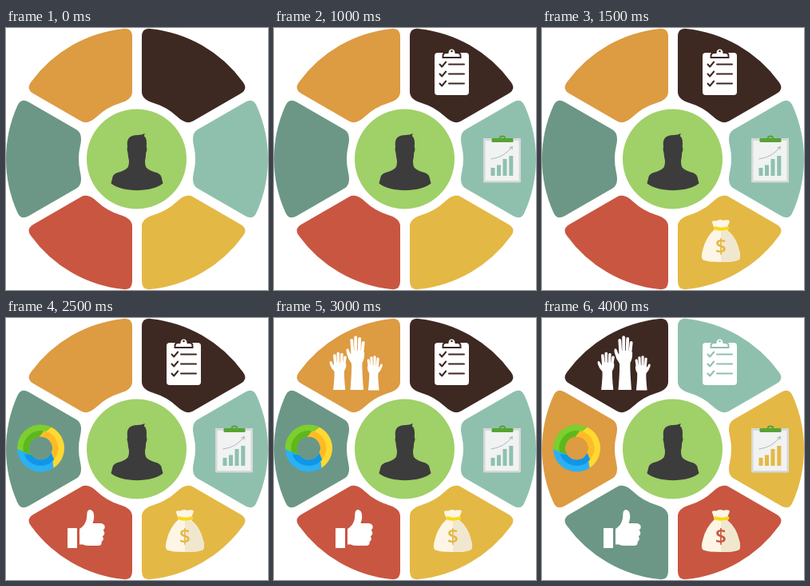
These frames come from a looping animation (328x328 px, 4.5 s). An HTML page:

```html
<!DOCTYPE html>
<html lang="en">
<head>
<meta charset="utf-8">
<title>Six-part wheel</title>
<style>
  html, body { margin: 0; width: 100%; height: 100%; overflow: hidden; background: #fff; }
  svg { display: block; width: 100vw; height: 100vh; }
  .line { fill: none; stroke-linecap: round; stroke-linejoin: round; }
  .outline { stroke: var(--color); }
  .tint { fill: var(--color); }
  text { font: 600 25px "Open Sans", "Noto Sans", sans-serif; text-anchor: middle; }
</style>
</head>
<body>
<svg viewBox="0 0 328 328">
  <defs>
    <g id="hand">
      <path class="line" stroke="#fff" stroke-width="3.8" d="M-6.2 6 L-5 25 M-1.3 2.2 V24 M3.7 4 L3 24 M8.2 9 L6.5 25"/>
      <path fill="#fff" d="M-7 22 L-5 19 H7 L9.6 21 Q10 29 7 34 Q6.500 42 8.500 68 H-8 Q-6 44 -6.500 35 Q-11 29 -12.500 22 Q-13.700 17.500 -12.200 16.500 Q-10.500 15.600 -9.600 18.500 Q-8.500 22 -7 24Z"/>
    </g>
  </defs>

  <g id="wedges" transform="translate(164 164)"></g>

  <circle cx="163.5" cy="164" r="62.5" fill="#a0d068"/>
  <path fill="#3c3c3c" d="M131.500 194.500 L133.500 186.500 Q134.500 183 139 181.300 Q150 178 152.500 174.500 Q154 172 154 166 Q152.800 161 152.500 156.500 Q150.800 152 152 149 Q151 140 154.500 137 Q158 134 165 134 Q170 134 173.800 132 L172.800 135.300 Q177 138 175.800 149 Q177.300 152 175.200 156.500 Q175 162 174 166 Q174 172 175.500 174.500 Q178 178 189 181.300 Q193.500 183 194.500 186.500 L196.500 194.500 C183 206 145 206 131.500 194.500Z"/>

  <g class="icon">
    <rect x="201" y="31" width="43" height="53" rx="4" fill="#fff"/>
    <path class="outline" fill="#fff" stroke-width="2" d="M211.500 37 V35 Q211.500 31 215.500 31 H217.500 Q218 25.500 222.500 25.500 Q227 25.500 227.500 31 H229.500 Q233.500 31 233.500 35 V37Z"/>
    <circle class="tint" cx="222.500" cy="29" r="1.300"/>
    <path class="line outline" stroke-width="2" d="M207.500 45.500 l2.700 3 l5-6 M207.500 57.500 l2.700 3 l5-6 M207.500 69.500 l2.700 3 l5-6 M219 45.500 H238 M219 57.500 H238 M219 69.500 H238"/>
  </g>

  <g class="icon">
    <rect x="262" y="138" width="47" height="55.500" rx="1" fill="#d5dad9"/>
    <rect x="264.500" y="141" width="42" height="50" fill="#f1f2f2"/>
    <rect x="272.500" y="138" width="27" height="5" rx="1" fill="#57a335"/>
    <path id="knob" class="line" stroke="#57a335" stroke-width="1.800" d="M282.500 138.500 Q282.500 135.500 286 135.500 Q289.500 135.500 289.500 138.500"/>
    <path class="tint" d="M271.500 175 h5 v10 h-5z M279 171.500 h5 v13.500 h-5z M286.500 164 h5 v21 h-5z M294.300 160 h5 v25 h-5z"/>
    <path class="line" stroke="#9ba9a5" stroke-width=".8" d="M272 164 Q288 162 298 149 M294.800 150 L298.400 148.500 L298 152"/>
  </g>

  <g class="icon">
    <path fill="#fdf6e6" d="M216 252 L213 243.500 Q212.500 240.500 218.500 241.500 Q223 239 227 241 Q231 239.500 234.500 241 Q235.500 242 233 247 L232 253 Q243 262 246.500 277 Q250 288 246 290.500 Q240 293 224 293 Q208 293 202 290.500 Q198 288 201.500 277 Q205 262 216 252Z"/>
    <path fill="#f1e7cf" d="M224 254 H232 Q243 262 246.500 277 Q250 288 246 290.500 Q240 293 224 293Z"/>
    <path class="line" stroke="#fbd914" stroke-width="4" d="M217 250.500 Q224 253 232.500 250.500"/>
    <text class="tint" x="224" y="282">$</text>
  </g>

  <g class="icon" fill="#fff">
    <rect x="77" y="263" width="12" height="25" rx=".7"/>
    <path d="M92 264 Q99.500 259.500 101 251 Q101.300 247 101.500 244 Q102 240 105.500 240 Q110.300 241 110.300 249 Q110 253 108.500 257 H119 Q124 258 123.700 262 Q123.400 265 121.500 265.500 Q124 268 123 271 Q122 273 120.800 273 Q122.500 276 121.500 278 Q120.500 280 119.500 280 Q120.500 284.500 116 285 H104 Q99 285 96 283.500 H92Z"/>
  </g>

  <g class="icon" id="ring" transform="translate(43.500 163)"></g>

  <g class="icon">
    <use href="#hand" transform="translate(103.500 22)"/>
    <use href="#hand" transform="translate(81.500 42.500) scale(.92 .7)"/>
    <use href="#hand" transform="translate(125 47) scale(-.83 .64)"/>
  </g>
</svg>

<script>
const STEP = 500, STEPS = 9;
const COLORS = ["#3e2822", "#8fc0ae", "#e4b844", "#c95641", "#6c9786", "#dd9b42"];
const SHIFTS = { 7: 3, 8: 1 };

function addPath(parent, attributes) {
  const path = document.createElementNS("http://www.w3.org/2000/svg", "path");
  for (const name in attributes) path.setAttribute(name, attributes[name]);
  parent.append(path);
  return path;
}

// A point at a distance along a wedge's side and an inset from its spoke.
function sidePoint(side, along, inset) {
  const x = along * 0.5 - inset * 0.866;
  const y = -along * 0.866 - inset * 0.5;
  return `${(side * x).toFixed(2)} ${y.toFixed(2)} `;
}

const left = (along, inset) => sidePoint(-1, along, inset);
const right = (along, inset) => sidePoint(1, along, inset);
const wedgeShape =
  "M" + left(84, 6) + "L" + left(153, 6) +
  "Q" + left(164.5, 6) + left(163.1, 17) +
  "A164 164 0 0 1 " + right(163.1, 17) +
  "Q" + right(164.5, 6) + right(153, 6) +
  "L" + right(84, 6) + "Q" + right(74.5, 6) + right(69.9, 21) +
  "A73 73 0 0 0 " + left(69.9, 21) +
  "Q" + left(74.5, 6) + left(84, 6) + "Z";

const wedges = COLORS.map((_, i) => addPath(document.querySelector("#wedges"), {
  d: wedgeShape, transform: `rotate(${30 + 60 * i})`
}));

// A third of the ring, with slanted ends.
function ringPart(start, radius) {
  const hole = 14.5, slant = 2.2;
  const point = (r, degrees) => {
    const angle = (degrees + (r - 29.5) * slant) * Math.PI / 180;
    return `${r * Math.cos(angle)} ${r * Math.sin(angle)}`;
  };
  const end = start + 120.5;
  return `M${point(radius, start)} A${radius} ${radius} 0 0 1 ${point(radius, end)}
    L${point(hole, end)} A${hole} ${hole} 0 0 0 ${point(hole, start)}Z`;
}

const ring = document.querySelector("#ring");
[[177, "#7ccf2e", "#5cb81c"], [297, "#ffd932", "#ffbb27"], [57, "#2bb1f3", "#1096e6"]]
  .forEach(([start, outer, inner]) => {
    addPath(ring, { d: ringPart(start, 29.5), fill: outer });
    addPath(ring, { d: ringPart(start, 22), fill: inner });
  });

const icons = [...document.querySelectorAll(".icon")];
const knob = document.querySelector("#knob");
let shown = -1;

function show(step) {
  const shift = SHIFTS[step] || 0;
  wedges.forEach((wedge, i) => {
    const color = COLORS[(i + shift) % COLORS.length];
    wedge.setAttribute("fill", color);
    icons[i].style.setProperty("--color", color);
    icons[i].style.visibility = step > i ? "visible" : "hidden";
  });
  knob.style.opacity = step === 7 ? 0 : 1;
}

function draw() {
  const step = Math.floor(performance.now() / STEP) % STEPS;
  if (step !== shown) show(shown = step);
  requestAnimationFrame(draw);
}
draw();
</script>
</body>
</html>
```
